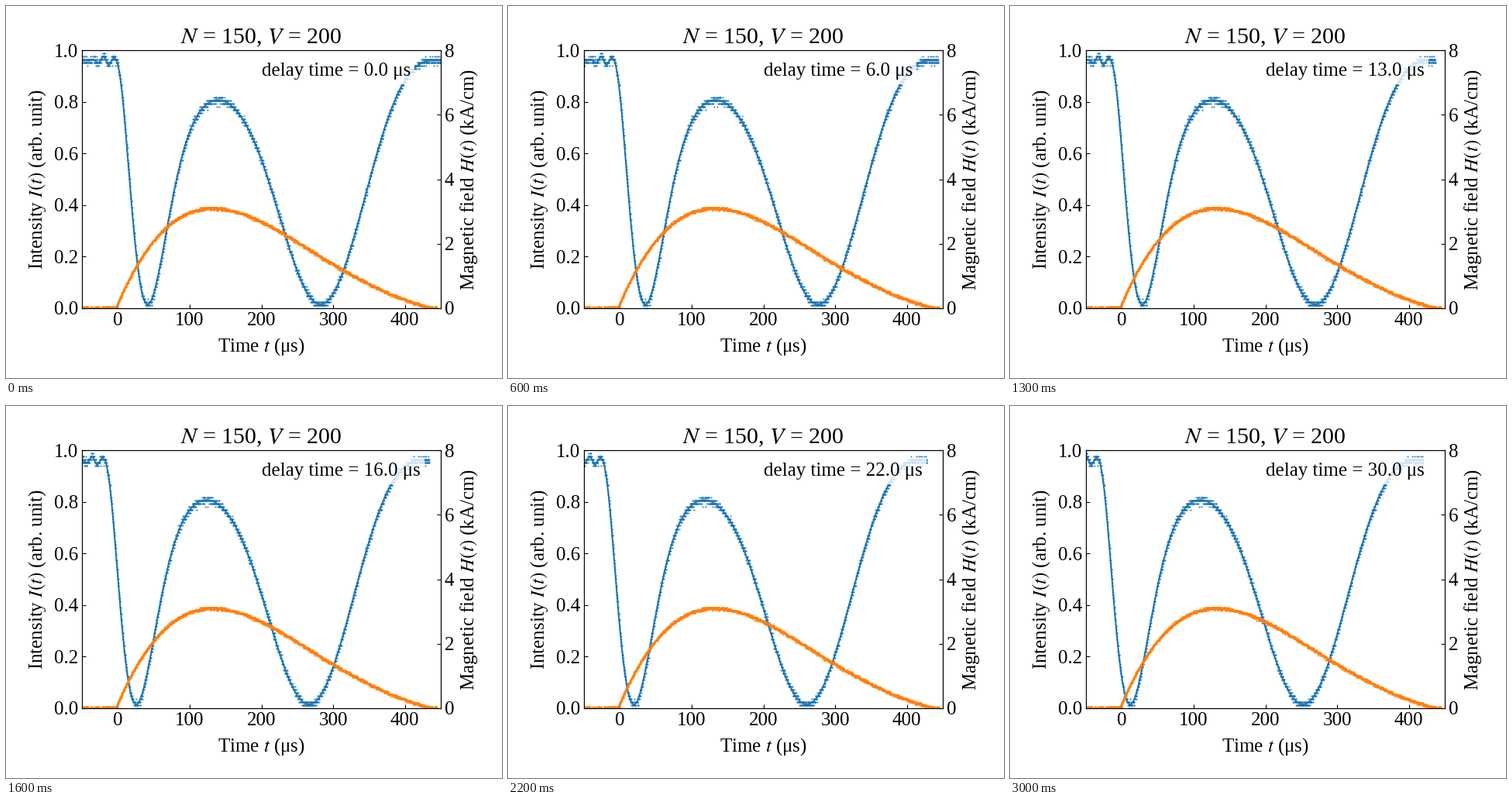
A matplotlib script for the animation above (3100 ms loop, 640 by 480 pixels).

```python
import numpy as np
import matplotlib.pyplot as plt
from matplotlib.animation import FuncAnimation

plt.rcParams.update({
    "font.family": "Liberation Serif",
    "mathtext.fontset": "stix",
    "font.size": 18,
    "xtick.direction": "in",
    "ytick.direction": "in",
})

FRAMES = 31
INTERVAL = 100
BLUE, ORANGE = "#1f77b4", "#ff7f0e"


def pulse(t):
    """Damped half-sine field pulse in kA/cm."""
    s = np.clip(t + 3, 0, 440)
    return 7.36 * np.exp(-0.00495 * s) * np.sin(np.pi * s / 440)


def transmission(t):
    """Light behind the analyser, its rotation following the field."""
    angle = (0.85 + 1.65e-6 * t ** 2) * pulse(t)
    ripple = np.cos(2 * np.pi * (t + 20.5) / 15.5)
    ripple *= 0.016 * np.exp(-((t + 16) / 14) ** 2)
    return 0.015 + 0.945 * np.cos(angle) ** 2 + ripple


def digitise(values, sigma, step):
    """Add noise and round to the recorder's levels."""
    return np.round((values + rng.normal(0, sigma, values.size)) / step) * step


rng = np.random.default_rng(4)
time = np.arange(-50, 450.2, 0.25)
field_time = np.arange(-50, 445, 0.2)
clean = transmission(time)

fig = plt.figure(figsize=(6.4, 4.8), dpi=100)
ax = fig.add_axes([0.1535, 0.1875, 0.7227, 0.6935])
ax2 = ax.twinx()

dots = dict(ls="none", marker=".", ms=1)
trace, = ax.plot(time, digitise(clean, 0.0075, 0.0122), color=BLUE, **dots)
core, = ax.plot(time, clean, color=BLUE, lw=1.5)
ax2.plot(field_time, digitise(pulse(field_time), 0.022, 0.04),
         color=ORANGE, **dots)
ax2.plot(field_time, pulse(field_time), color=ORANGE, lw=1.5)

ax.set(xlim=(-50, 450), ylim=(0, 1))
ax.set_xlabel("Time $t$ (μs)", labelpad=7)
ax.set_ylabel("Intensity $I(t)$ (arb. unit)", labelpad=6)
ax.set_title("$N$ = 150, $V$ = 200")
ax2.set(ylim=(0, 8), yticks=range(0, 9, 2),
        ylabel="Magnetic field $H(t)$ (kA/cm)")
label = ax.text(200, 0.9, "", bbox=dict(fc="white", ec="none", alpha=0.8))


def update(k):
    delay = float(k)
    for line in (trace, core):
        line.set_xdata(time - delay)
    label.set_text(f"delay time = {delay:.1f} μs")
    return trace, core, label


anim = FuncAnimation(fig, update, frames=FRAMES, interval=INTERVAL,
                     repeat=True, repeat_delay=0)
plt.show()
```
